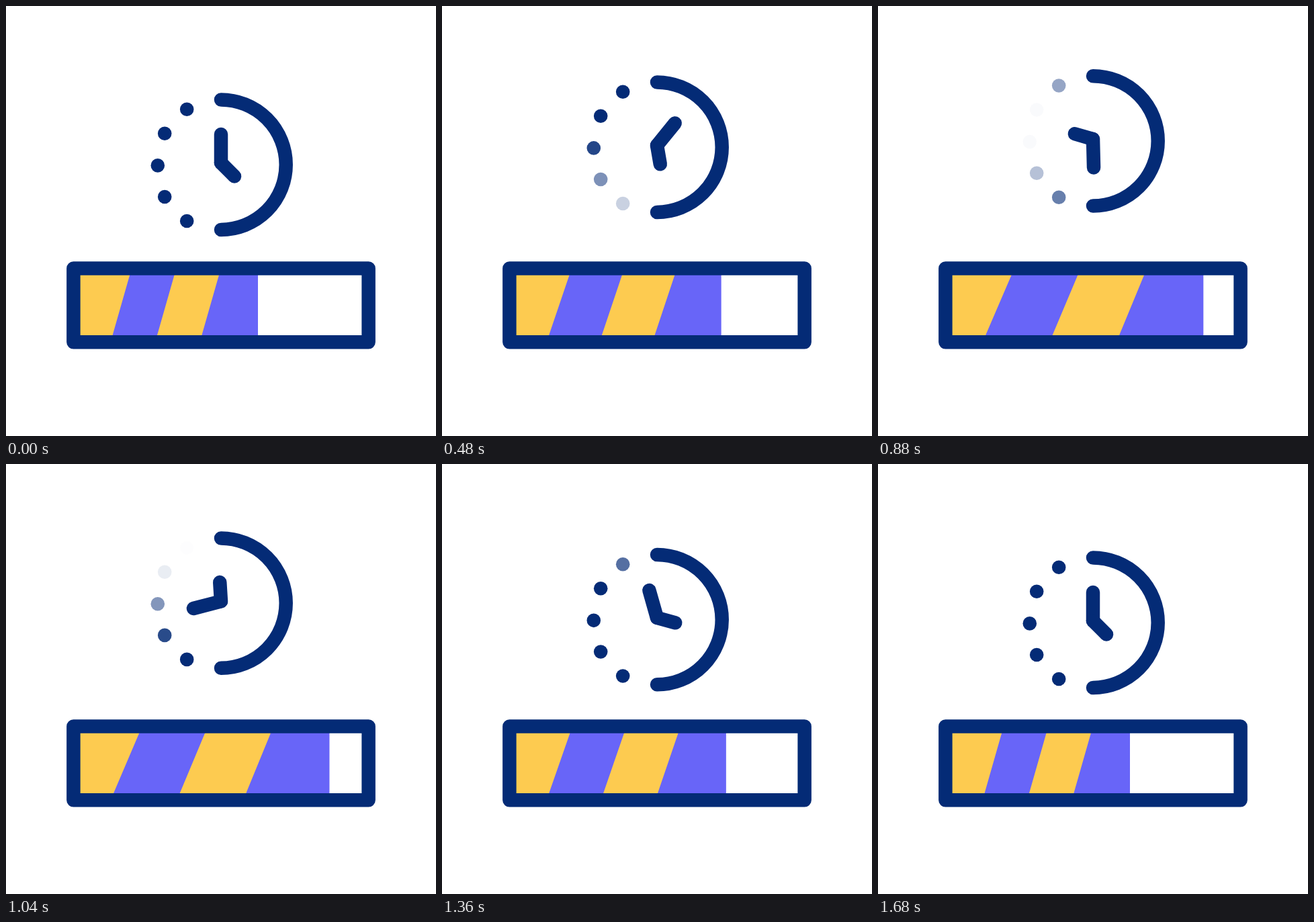
An HTML page for the animation above (1720 ms loop, 640 px wide and 640 px high).

```html
<!DOCTYPE html>
<html lang="en">
<head>
<meta charset="utf-8">
<title>Loading</title>
<style>
  html, body { margin: 0; width: 100%; height: 100%; overflow: hidden; background: #fff; }
  svg { display: block; width: 100vw; height: 100vh; }
  .line { fill: none; stroke: #042b76; stroke-width: 20.5; stroke-linecap: round; stroke-linejoin: round; }
</style>
</head>
<body>
<svg viewBox="0 0 640 640">
  <g id="clock">
    <path class="line" d="M320 139.5A96.7 96.7 0 0 1 320 332.9"/>
    <g id="dots" fill="#042b76"></g>
    <path id="minute" class="line" d="M320 233.4V191"/>
    <path id="hour" class="line" d="M320 233.4L340 253.4"/>
  </g>
  <path id="fill" fill="#6865f8"/>
  <path id="stripes" fill="#fdcb50"/>
  <rect class="line" x="100.4" y="390.6" width="439.2" height="109.7"/>
</svg>
<script>
const LOOP = 1720, STEP = 40, END = 1680, FADE = 400;
const $ = id => document.getElementById(id);
const clamp = v => Math.min(1, Math.max(0, v));
const smooth = s => s * s * (3 - 2 * s);

// Progress 0..1 between two times, eased like cubic-bezier(a, 0, b, 1).
function ease(t, from, to, a, b) {
  const x = clamp((t - from) / (to - from));
  let lo = 0, hi = 1;
  for (let i = 0; i < 24; i++) {
    const s = (lo + hi) / 2, r = 1 - s;
    if (3 * a * s * r * r + 3 * b * s * s * r + s * s * s < x) lo = s;
    else hi = s;
  }
  return smooth(lo);
}

const lift = t => 36 * (ease(t, 0, 780, .62, .43) - ease(t, 780, END, .5, .29));
const grow = t => 109.6 * (ease(t, 0, 900, .56, .745) - ease(t, 900, END, .67, .5));
const minuteTurn = t => 360 * ease(t, 0, 1620, .61, .51);
const hourTurn = t => 360 * ease(t, 0, END, .6, .57);
const fade = (t, start) => smooth(clamp((t - start) / FADE));

// Bottom to top; each dot fades a little later than the one below.
const dots = [[269.2, 320], [236.2, 284], [225.8, 237.4], [236.2, 189.8], [269.2, 153.8]].map(([x, y], i) => {
  const el = document.createElementNS("http://www.w3.org/2000/svg", "circle");
  el.setAttribute("cx", x);
  el.setAttribute("cy", y);
  el.setAttribute("r", 10.3);
  $("dots").append(el);
  return { el, out: 200 + 75 * i + 10 * i * i };
});

// Slanted stripe edge i, as upper and lower x, for a bar grown by g.
function edge(i, g) {
  const upper = 184 + 66.4 * i + g * (.132 + .2955 * i);
  const lower = 158.6 + 66.4 * i + g * (.014 + .3025 * i);
  const over = (upper - lower) * 5 / 89;
  return [upper + over, lower - over];
}

function draw(t) {
  $("clock").setAttribute("transform", `translate(0 ${-lift(t)})`);
  $("minute").setAttribute("transform", `rotate(${minuteTurn(t)} 320 233.4)`);
  $("hour").setAttribute("transform", `rotate(${hourTurn(t)} 320 233.4)`);
  for (const { el, out } of dots) {
    el.setAttribute("opacity", clamp(1 - fade(t, out) + fade(t, out + 452)));
  }

  const g = grow(t);
  const [[a, b], [c, d], [e, f]] = [0, 1, 2].map(i => edge(i, g));
  $("fill").setAttribute("d", `M105 396H${375 + g}V495H105Z`);
  $("stripes").setAttribute("d", `M105 396H${a}L${b} 495H105ZM${c} 396H${e}L${f} 495H${d}Z`);
}

const start = performance.now();
function tick() {
  const t = (performance.now() - start) % LOOP;
  draw(Math.floor(t / STEP) * STEP);
  requestAnimationFrame(tick);
}
tick();
</script>
</body>
</html>
```
